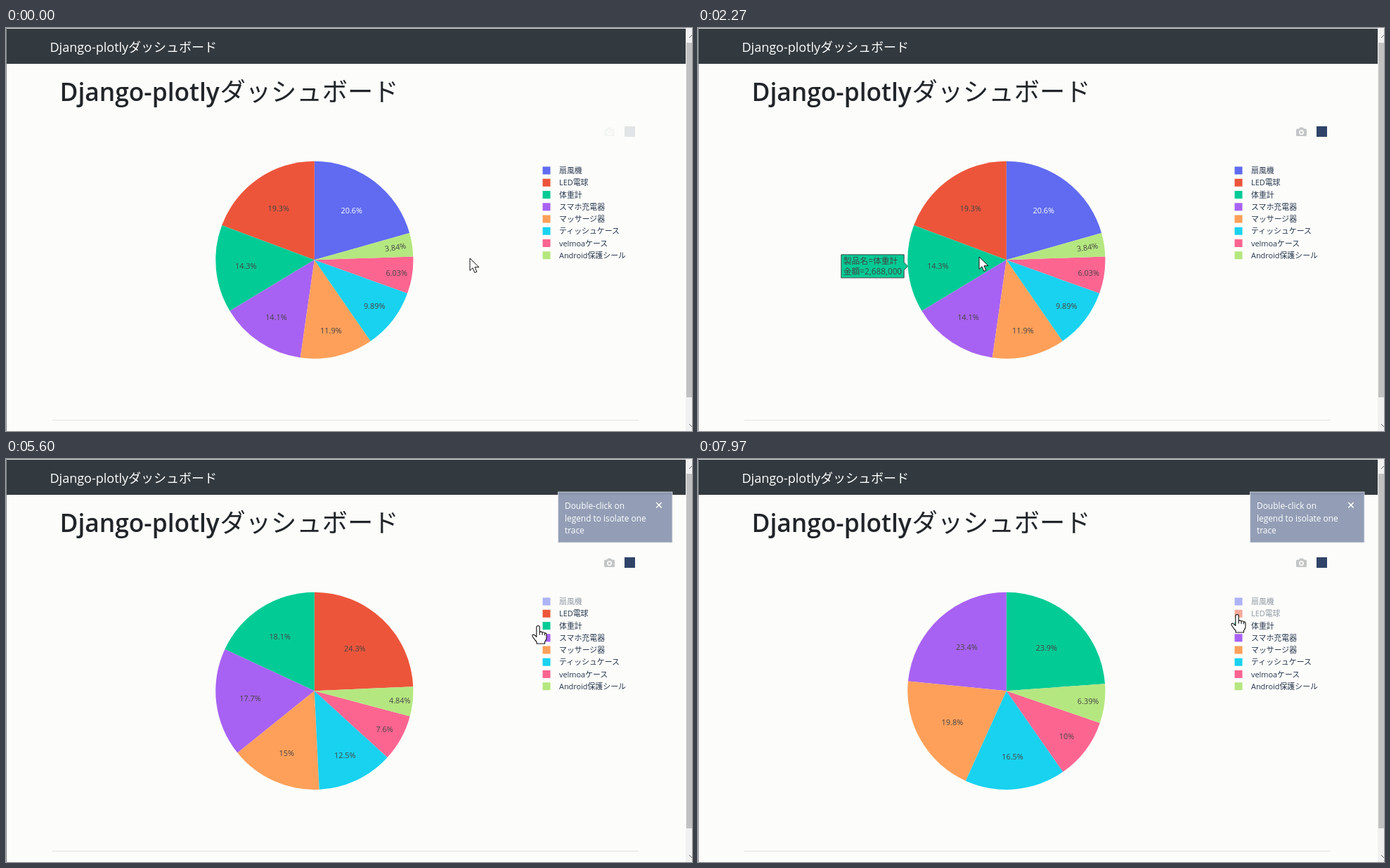
Animation of 976x574 px, one loop 8000 ms. Source, as an HTML page:

```html
<!DOCTYPE html>
<html lang="ja">
<head>
<meta charset="utf-8">
<title>Django-plotly</title>
<style>
html, body { margin: 0; width: 100%; height: 100%; overflow: hidden; background: #fcfdfa; }
svg { display: block; width: 976px; height: 574px; }
text { font-family: "Open Sans", "Noto Sans CJK JP", "Noto Sans CJK", sans-serif; }
.legend text { font-size: 10.9px; fill: #26354e; }
.pie text { font-size: 10.9px; text-anchor: middle; }
.tip text { font-size: 11.8px; }
.note text { font-size: 11.9px; font-weight: 500; fill: #fff; }
</style>
</head>
<body>
<svg viewBox="0 0 976 574">
  <rect width="976" height="574" fill="#fcfdfa"/>
  <rect width="967" height="1" fill="#e4e5e5"/>
  <rect y="1" width="967" height="50" fill="#333a3f"/>
  <text x="62.5" y="33.5" font-size="18" fill="#fff">Django-plotly</text>
  <text x="174" y="33.5" font-size="18" fill="#fff">ダッシュボード</text>
  <text x="76.5" y="104" font-size="35.3" font-weight="600" fill="#212529">Django-plotly</text>
  <text x="304.5" y="103.5" font-size="36.3" font-weight="300" fill="#212529">ダッシュボード</text>
  <path d="M66 558.5H900" stroke="#e2e3df"/>
  <rect width="1" height="574" fill="#85898b"/>
  <rect x="967" width="9" height="574" fill="#f1f1f1"/>
  <rect x="968" y="21" width="8" height="505" fill="#c1c1c1"/>
  <path d="M972 14l4-4M972 564l4 4" stroke="#666"/>
  <g id="modebar">
    <path fill="#c3c6c7" fill-rule="evenodd" d="M852.5 143.5H855l1.2-2h4.6l1.2 2h2.5q1.5 0 1.5 1.5v7.5q0 1.5-1.5 1.5h-12q-1.5 0-1.5-1.5V145q0-1.5 1.5-1.5zM858.5 145a3.6 3.6 0 1 0 .01 0zM858.5 146.7a1.9 1.9 0 1 1-.01 0z"/>
    <rect x="880" y="140" width="15" height="15" fill="#2f4468"/>
  </g>
  <g id="pie" class="pie"></g>
  <g id="legend" class="legend"></g>
  <g id="tip" class="tip">
    <path/><text/><text/>
  </g>
  <g id="note" class="note">
    <rect x="785.5" y="47" width="162.5" height="72" fill="#8f9bb3" fill-opacity=".96" stroke="#dfe3ea" stroke-width=".8"/>
    <text x="795" y="71">Double-click on</text>
    <text x="795" y="88.7">legend to isolate one</text>
    <text x="795" y="106.4">trace</text>
    <path d="M925.3 62l7.4 7.4m0-7.4l-7.4 7.4" stroke="#fff" stroke-width="1.5"/>
  </g>
  <path id="arrow" d="M0 0V17.5L4 13.7L6.8 20.5L9.8 19.2L7 12.7H13Z" fill="#fff" stroke="#111"/>
  <path id="hand" d="M-2.2 2.2a2.2 2.2 0 0 1 4.4 0V9q2.2-1.6 3.8.6q2.2-1.1 3.5.9q2.5-.6 2.5 2v4.5q0 3-2.5 6v2.5H-2V23q-3-3-6-8q-.7-2.7 2-2.3q2 .8 3.8 3.3zM2.2 9v4M6 9.7v3.6M9.5 10.7v3" fill="#fff" stroke="#111" stroke-width="1.1" stroke-linejoin="round"/>
</svg>
<script>
const LOOP = 8000, CX = 438.8, CY = 330.3, R = 140.6;
const HIDE_FIRST = 4900, HIDE_SECOND = 7400;

const items = [
  ['扇風機', 3865, '#606bf1', '#fff'],
  ['LED電球', 3620, '#ed553b'],
  ['体重計', 2688, '#03cb95'],
  ['スマホ充電器', 2640, '#a862f3'],
  ['マッサージ器', 2230, '#fea05a'],
  ['ティッシュケース', 1855, '#18d2f0'],
  ['velmoaケース', 1131, '#fd6591'],
  ['Android保護シール', 720, '#b5e780']
].map(([name, value, color, ink = '#444']) => ({ name, value, color, ink }));

// Pointer waypoints: time, x, y
const route = [
  [0, 660, 328], [200, 642, 322], [600, 535, 288], [970, 512, 270],
  [1200, 500, 265], [1550, 400, 250], [1900, 366, 320], [2270, 400, 326],
  [2450, 405, 330], [2700, 450, 400], [2860, 508, 388], [3020, 560, 352],
  [3330, 700, 342], [3700, 754.5, 208], [4050, 757, 202], [5000, 757, 202],
  [5500, 757, 237.5], [5750, 757, 237.5], [6300, 736, 412], [6600, 734, 400],
  [6720, 734, 400], [7080, 767, 221.5], [8000, 767, 221.5]
];

const $ = id => document.getElementById(id);
const clamp = v => Math.max(0, Math.min(1, v));
const smooth = v => v * v * (3 - 2 * v);

function add(parent, tag, attrs, text = '') {
  const el = document.createElementNS('http://www.w3.org/2000/svg', tag);
  set(el, attrs);
  el.textContent = text;
  return parent.appendChild(el);
}

function set(el, attrs) {
  for (const key in attrs) el.setAttribute(key, attrs[key]);
}

function polar(angle, r) {
  return [CX + r * Math.sin(angle), CY - r * Math.cos(angle)];
}

// The first visible slice ends clockwise from the top; the rest run counter-clockwise.
function layout(hidden) {
  const shown = items.slice(hidden);
  const total = shown.reduce((sum, item) => sum + item.value, 0);
  let end = 2 * Math.PI * shown[0].value / total;
  return shown.map(item => {
    const share = item.value / total, half = Math.PI * share;
    const start = end - 2 * half, mid = end - half;
    const inset = 1 / (1 + 1 / Math.sin(half));
    const slice = { item, share, start, end, mid, inset, center: polar(mid, R * (1 - inset)) };
    end = start;
    return slice;
  });
}

const layouts = [0, 1, 2].map(layout);

const pies = layouts.map(slices => {
  const group = add($('pie'), 'g', {});
  for (const { item, start, end } of slices) {
    add(group, 'path', {
      d: `M${CX} ${CY}L${polar(start, R)}A${R} ${R} 0 0 1 ${polar(end, R)}Z`,
      fill: item.color
    });
  }
  for (const { item, share, mid, center } of slices) {
    const narrow = share < 0.04;
    const [x, y] = narrow ? polar(mid, R * 0.829) : center;
    const turn = narrow ? mid * 180 / Math.PI - 90 : 0;
    add(group, 'text', {
      transform: `translate(${x} ${y}) rotate(${turn})`, y: 4, fill: item.ink
    }, Number((share * 100).toPrecision(3)) + '%');
  }
  return group;
});

const rows = items.map((item, i) => {
  const y = 203 + 17.25 * i;
  const row = add($('legend'), 'g', {});
  add(row, 'rect', { x: 763.5, y: y - 5.5, width: 11, height: 11, fill: item.color });
  add(row, 'text', { x: 787, y: y + 4 }, item.name);
  return row;
});

function pointerAt(t) {
  const i = Math.max(1, route.findIndex(p => p[0] > t));
  const [t0, x0, y0] = route[i - 1], [t1, x1, y1] = route[i];
  const k = smooth(clamp((t - t0) / (t1 - t0)));
  return [x0 + (x1 - x0) * k, y0 + (y1 - y0) * k];
}

function sliceAt(slices, x, y) {
  const dx = x - CX, dy = y - CY, turn = 2 * Math.PI;
  if (Math.hypot(dx, dy) > R) return null;
  const angle = Math.atan2(dx, -dy);
  return slices.find(s => (angle - s.start + 2 * turn) % turn < s.end - s.start);
}

function drawTip(slice) {
  const tip = $('tip');
  tip.style.display = slice ? '' : 'none';
  if (!slice) return;
  const { item, mid, inset, center } = slice;
  const side = Math.sin(mid) < 0 ? -1 : 1;
  const [box, first, second] = tip.children;
  first.textContent = '製品名=' + item.name;
  second.textContent = '金額=' + (item.value * 1000).toLocaleString('en-US');
  const textWidth = Math.max(first.getComputedTextLength(), second.getComputedTextLength());
  const far = side * (textWidth + 11.5);
  const near = side * 5.5;
  const left = side > 0 ? 8.5 : -textWidth - 8.5;
  set(tip, { transform: `translate(${center[0] + side * inset * R} ${center[1]})` });
  set(box, {
    d: `M0 0L${near} -5.5V-16.5H${far}V16.5H${near}V5.5Z`,
    fill: item.color, stroke: item.ink
  });
  set(first, { x: left, y: -3.7, fill: item.ink });
  set(second, { x: left, y: 11.3, fill: item.ink });
}

function render(t) {
  const hidden = (t >= HIDE_FIRST) + (t >= HIDE_SECOND);
  pies.forEach((pie, i) => { pie.style.display = i === hidden ? '' : 'none'; });
  rows.forEach((row, i) => set(row, { opacity: i < hidden ? 0.5 : 1 }));
  set($('modebar'), { opacity: 0.12 + 0.88 * smooth(clamp(t / 260)) });
  set($('note'), { opacity: smooth(clamp((t - HIDE_FIRST) / 700)) });

  const [x, y] = pointerAt(t);
  drawTip(sliceAt(layouts[hidden], x, y));
  const onLegend = x > 750 && y > 194 && y < 333;
  $('arrow').style.display = onLegend ? 'none' : '';
  $('hand').style.display = onLegend ? '' : 'none';
  set($(onLegend ? 'hand' : 'arrow'), { transform: `translate(${x} ${y})` });
}

const began = performance.now();
function tick() {
  render((performance.now() - began) % LOOP);
  requestAnimationFrame(tick);
}
tick();
</script>
</body>
</html>
```
